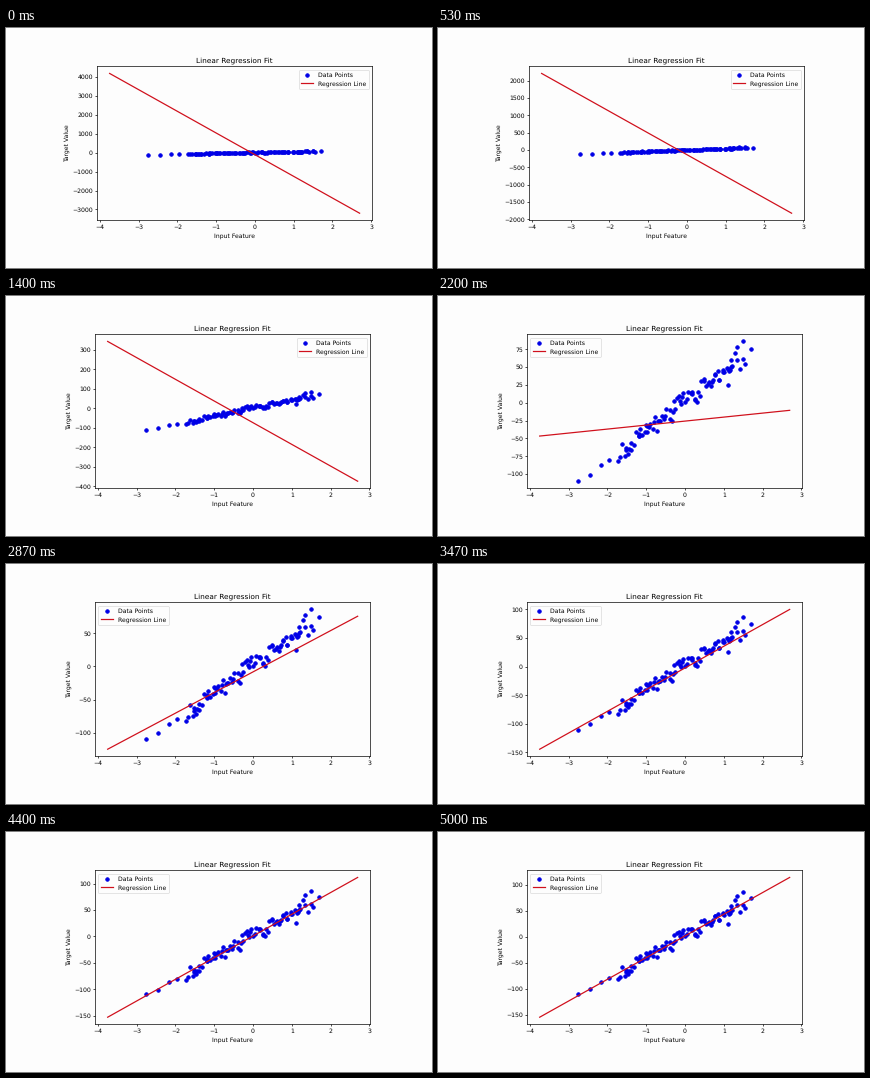
A matplotlib script for the animation above (5.07 s loop, 426 px wide and 240 px high).

```python
import numpy as np
import matplotlib.pyplot as plt
from matplotlib.animation import FuncAnimation

W, H, DPI = 426, 240, 44.375
FRAMES, STEP_MS = 78, 65
AX_W, AX_H, AX_BOTTOM = 275, 153.76, 47.8
PAPER = "#fdfdfd"

plt.rcParams.update({
    "font.family": "DejaVu Sans",
    "text.hinting": "none",
    "axes.linewidth": 1.1,
    "xtick.major.width": 1.1,
    "ytick.major.width": 1.1,
    "axes.facecolor": PAPER,
    "figure.facecolor": PAPER,
})


def make_data(n=84):
    """Noisy points along a line, plus the few that set its extent."""
    rng = np.random.default_rng(4)
    x = np.linspace(-1.65, 1.42, n) + rng.normal(0, 0.03, n)
    y = 42 * x + 2 + rng.normal(0, 8, n).clip(-14, 14)
    edge_x = [-2.75, -2.45, -2.16, -1.97, -1.74, 1.12, 1.33, 1.49, 1.55, 1.7]
    edge_y = [-110, -101, -87, -80, -82, 25, 78, 86, 55, 75]
    return np.append(x, edge_x), np.append(y, edge_y)


PX, PY = make_data()
LINE_X = np.array([PX.min() - 1, PX.max() + 1])


def fit(ms):
    """Slope and intercept as gradient descent decays along two modes."""
    t = np.interp(ms, (250, 530, 1400, 2200, 5000),
                  (0, 0.422, 1.662, 2.934, 7.2))
    slow, fast = -476 * np.exp(-t), -710 * np.exp(-1.465 * t)
    return 42 + slow + fast, 2 + 1.345 * slow - 0.745 * fast


fig = plt.figure(figsize=((W + 1e-6) / DPI, (H + 1e-6) / DPI), dpi=DPI)
ax = fig.add_axes([0.2, AX_BOTTOM / H, AX_W / W, AX_H / H])


def center():
    """Keep the plot with its labels in the middle of the stage."""
    box = ax.get_tightbbox(fig.canvas.get_renderer())
    left = ax.get_position().x0 * W + 212.5 - (box.x0 + box.x1) / 2
    ax.set_position([left / W, AX_BOTTOM / H, AX_W / W, AX_H / H])


def draw(i):
    slope, bias = fit((i + 0.5) * STEP_MS)
    ax.clear()
    ax.scatter(PX, PY, color="#0000e6", label="Data Points")
    ax.plot(LINE_X, slope * LINE_X + bias, color="#d0101c", lw=2,
            label="Regression Line")
    ax.set_title("Linear Regression Fit")
    ax.set_xlabel("Input Feature")
    ax.set_ylabel("Target Value")
    ax.legend()
    center()
    return []


anim = FuncAnimation(fig, draw, frames=FRAMES, init_func=lambda: [],
                     interval=STEP_MS, repeat=True, repeat_delay=0)
plt.show()
```
